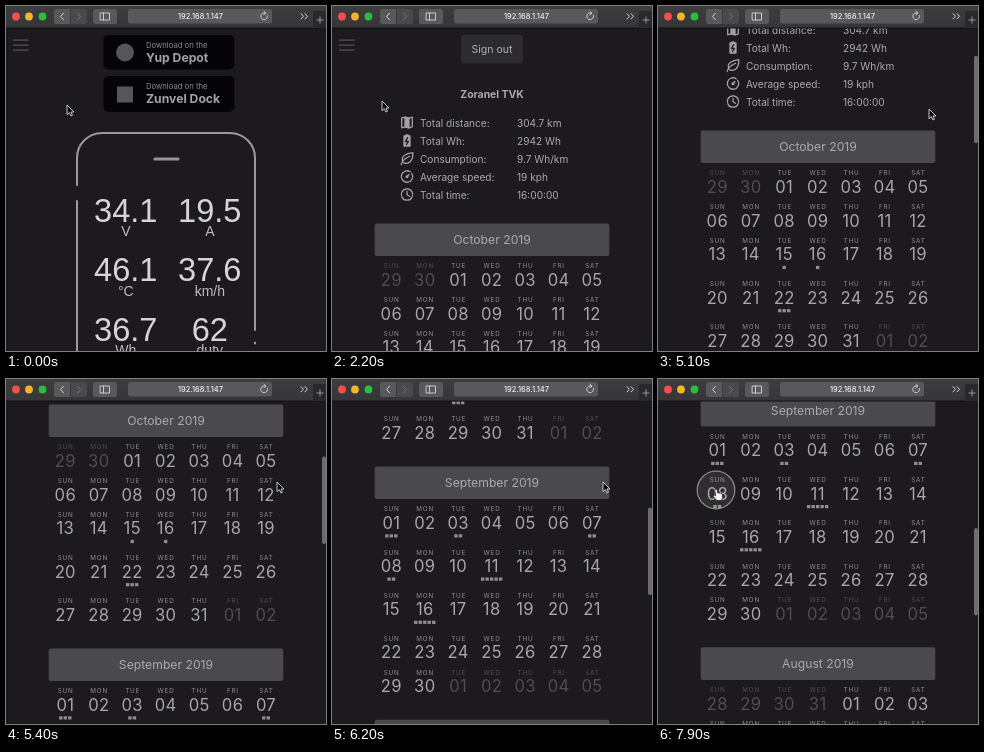
An HTML page that plays this animation: 320x345 px, repeating every 8000 ms.

```html
<!DOCTYPE html>
<html lang="en">
<head>
<meta charset="utf-8">
<title>Ride dashboard</title>
<style>
@property --scroll { syntax: "<number>"; inherits: true; initial-value: 0; }

html, body { margin: 0; width: 100%; height: 100%; overflow: hidden; background: #1c1a1d; }
svg { display: block; width: 320px; height: 345px; font-family: Inter, "Open Sans", sans-serif; }
.mid { text-anchor: middle; }
.line { fill: none; stroke-linecap: round; stroke-linejoin: round; }

/* One 8 s loop, advancing in 100 ms ticks (1.25% each) */
svg, #home, #menu, #account, #cursor, #arrow, #hand, #ring, #thumb {
  animation: 8s step-end -20ms infinite;
}
svg { animation-name: scroll; }
#home { animation-name: push; }
#menu { animation-name: leave; }
#account { animation-name: enter; }
#cursor { animation-name: move; }
#arrow { animation-name: arrow; }
#hand { animation-name: hand; }
#ring { animation-name: ring; }
#thumb { animation-name: thumb; }

#sheet { transform: translateY(calc(var(--scroll) * -1px)); }
#thumb rect { transform: translateY(calc(var(--scroll) * .281px)); }

@keyframes scroll {
  0% { --scroll: 0; }
  57.5% { --scroll: 0; animation-timing-function: steps(2); }
  60% { --scroll: 18; animation-timing-function: steps(3); }
  63.75% { --scroll: 93; animation-timing-function: steps(3); }
  67.5% { --scroll: 192; animation-timing-function: steps(4); }
  72.5% { --scroll: 302.5; animation-timing-function: steps(4); }
  77.5% { --scroll: 374; animation-timing-function: steps(4); }
  82.5% { --scroll: 427.5; animation-timing-function: steps(3); }
  86.25%, 100% { --scroll: 446.5; }
}
@keyframes push {
  0% { transform: none; }
  11.25% { transform: translateX(22px); }
  12.5% { transform: translateX(74px); }
  13.75% { transform: translateX(113px); }
  15% { transform: translateX(128.5px); }
  16.25% { transform: translateX(129px); }
  25%, 100% { transform: translateX(129px); visibility: hidden; }
}
@keyframes leave { 25%, 100% { visibility: hidden; } }
@keyframes enter { 0% { visibility: hidden; } 25%, 100% { visibility: visible; } }
@keyframes move {
  0% { transform: translate(61px, 99px); animation-timing-function: steps(3); }
  3.75% { transform: translate(43px, 77px); animation-timing-function: steps(3); }
  7.5% { transform: translate(18px, 42px); animation-timing-function: steps(1); }
  8.75% { transform: translate(15px, 38px); }
  10% { transform: translate(15px, 38px); animation-timing-function: steps(4); }
  15% { transform: translate(20px, 42px); }
  17.5% { transform: translate(20px, 42px); animation-timing-function: steps(4); }
  22.5% { transform: translate(50px, 95px); }
  37.5% { transform: translate(50px, 95px); animation-timing-function: steps(3); }
  41.25% { transform: translate(108px, 106px); animation-timing-function: steps(3); }
  45% { transform: translate(217px, 109px); animation-timing-function: steps(3); }
  48.75% { transform: translate(271px, 103px); }
  87.5% { transform: translate(271px, 103px); animation-timing-function: steps(3); }
  91.25% { transform: translate(195px, 107px); animation-timing-function: steps(2); }
  93.75% { transform: translate(95px, 109px); animation-timing-function: steps(1); }
  95% { transform: translate(46px, 109px); animation-timing-function: steps(1); }
  96.25% { transform: translate(29px, 109px); animation-timing-function: steps(2); }
  98.75%, 100% { transform: translate(58px, 110px); }
}
@keyframes arrow {
  0% { opacity: 1; }
  7.5% { opacity: 0; }
  26.25% { opacity: 1; }
  95%, 100% { opacity: 0; }
}
@keyframes hand {
  0% { opacity: 0; }
  7.5% { opacity: 1; }
  26.25% { opacity: 0; }
  95%, 100% { opacity: 1; }
}
@keyframes ring { 0% { opacity: 0; } 98.75%, 100% { opacity: 1; } }
@keyframes thumb { 0% { opacity: 0; } 55%, 100% { opacity: 1; } }

#menu text { font-size: 8.7px; fill: #959496; }
#menu .brand { font-size: 12px; letter-spacing: 2px; fill: #5c5b5d; }
.store { font-size: 12.2px; font-weight: 700; fill: #a3a2a4; }
.hint { font-size: 7.7px; fill: #8b8a8c; }
#readings { font-family: "Liberation Sans", Arial, sans-serif; text-anchor: middle; }
.value { font-size: 32.6px; fill: #d5d4d6; }
.unit { font-size: 14px; fill: #bdbcbe; }
.stat { font-size: 10.1px; fill: #aaa9ab; }
.month { font-size: 12.2px; fill: #abaaac; }
.day { font-size: 6.3px; letter-spacing: .8px; fill: #8d8c8e; }
.date { font-size: 16.6px; letter-spacing: .3px; fill: #a7a6a8; }
#account .dim { fill: #4e4d4f; }
</style>
</head>
<body>
<svg viewBox="0 0 320 345">
  <defs>
    <linearGradient id="shade" x1="0" y1="0" x2=".1" y2="1">
      <stop offset="0" stop-color="#2d2c2e"/>
      <stop offset="1" stop-color="#454446"/>
    </linearGradient>
    <linearGradient id="chrome" x1="0" y1="0" x2="0" y2="1">
      <stop offset="0" stop-color="#3d3c3f"/>
      <stop offset="1" stop-color="#363538"/>
    </linearGradient>
    <path id="burger" d="M7 34.2H22.5M7 39.2H22.5M7 44.2H22.5" stroke="#434244" stroke-width="1.7"/>
  </defs>

  <g id="menu">
    <rect y="22" width="130" height="323" fill="url(#shade)"/>
    <text class="brand" x="11" y="50">dorv</text>
  </g>

  <g id="home">
    <rect x="-2" y="22" width="322" height="323" fill="#1c1a1d"/>
    <use href="#burger"/>
    <rect x="97.5" y="29" width="131" height="34.5" rx="5" fill="#050406"/>
    <rect x="97.5" y="70" width="131" height="36" rx="5" fill="#050406"/>
    <circle cx="119" cy="46.5" r="9" fill="#565557"/>
    <rect x="111" y="80.5" width="16" height="16" fill="#565557"/>
    <text class="hint" x="140" y="42">Download on the</text>
    <text class="store" x="140" y="55.5">Yup Depot</text>
    <text class="hint" x="140" y="83">Download on the</text>
    <text class="store" x="140" y="96.7">Zunvel Dock</text>
    <path class="line" stroke="#9a999b" stroke-width="2"
      d="M71 179V152A25 25 0 0 1 96 127H224A25 25 0 0 1 249 152V324M249 336.5V337.5M71 195V345"/>
    <path class="line" stroke="#949395" stroke-width="3.2" d="M149 153H172"/>
    <g id="readings"></g>
  </g>

  <g id="account">
    <rect y="22" width="320" height="323" fill="#1c1a1d"/>
    <g id="sheet">
      <use href="#burger"/>
      <rect x="129" y="29" width="62" height="28.5" rx="2" fill="#2c2b2d"/>
      <text class="mid" x="160" y="47" font-size="10.5" fill="#b0afb1">Sign out</text>
      <text class="mid" x="160" y="92" font-size="10.4" font-weight="700" fill="#a9a8aa">Zoranel TVK</text>
      <g class="line" stroke="#a1a0a2" stroke-width="1.3">
        <g transform="translate(75 116.5)">
          <path d="M-5.3-4.5-2-5.3 2-4.3 5.3-5.3V4.3L2 5.3-2 4.3-5.3 5.3Z"/>
          <path d="M-2-5.3 2-4.3V5.3L-2 4.3Z" fill="#a1a0a2"/>
        </g>
        <g transform="translate(75 134.5)">
          <path d="M-3-4.5H-1V-5.5H1V-4.5H3V5.5H-3Z" fill="#a1a0a2"/>
          <path d="M.7-2.8-1.6 1H1.4L-.5 4" stroke="#1c1a1d"/>
        </g>
        <path transform="translate(75 152.5)" d="M-5.8 6C-5 1 0-1 2.6-2.2M-4 3.5C-7-3 0-5 5.8-5.8C6.2 2 2 6.5-3.2 4.4"/>
        <path transform="translate(75 170.5)" d="M3.2-4.7A5.7 5.7 0 1 0 4.7-3.2M0 0 2-2M-1 0A1 1 0 1 0 0-1"/>
        <path transform="translate(75 188.5)" d="M0-5.7A5.7 5.7 0 1 1-.01-5.7M0-3.2V.3L2.5 1.8"/>
      </g>
    </g>
  </g>

  <g id="thumb"><rect x="316" y="23.5" width="4" height="87.5" rx="2" fill="#6c6b6d"/></g>

  <g id="toolbar">
    <rect width="320" height="22" fill="url(#chrome)"/>
    <rect y="21.5" width="320" height="1" fill="#111012"/>
    <circle cx="10" cy="10.5" r="3.9" fill="#f84e48"/>
    <circle cx="23" cy="10.5" r="3.9" fill="#f4b42c"/>
    <circle cx="36.5" cy="10.5" r="3.9" fill="#2dbd3e"/>
    <g fill="#59585b">
      <path d="M50.5 3H64V18H50.5Q48 18 48 15.5V5.5Q48 3 50.5 3Z"/>
      <path d="M65 3H78.5Q81 3 81 5.5V15.5Q81 18 78.5 18H65Z" fill="#4a494c"/>
      <rect x="87" y="3" width="24" height="15" rx="2.5"/>
      <rect x="122" y="3" width="144" height="14.5" rx="2.5"/>
    </g>
    <g class="line" stroke="#d6d5d8">
      <path d="M57.5 7.3 54.5 10.5 57.5 13.7"/>
      <path d="M71.5 7.3 74.5 10.5 71.5 13.7" stroke="#777679"/>
      <path d="M94.5 7H103.5V14H94.5ZM97.5 7V14" stroke-width=".9"/>
      <path d="M261.5 9.5A3.4 3.4 0 1 1 259.5 7.1M258 5.3 260 7.2 257.8 8.8" stroke-width=".9"/>
      <path d="M295 7.7 297.5 10.3 295 12.9M299 7.7 301.5 10.3 299 12.9"/>
    </g>
    <text class="mid" x="194.5" y="13.2" font-size="7.5" font-weight="500" fill="#f0eff2">192.168.1.147</text>
    <rect x="307" y="5" width="13" height="17" fill="#29282b"/>
    <path d="M310.5 14H317.5M314 10.5V17.5" stroke="#98979a"/>
  </g>

  <circle id="ring" cx="58" cy="111" r="18.8" fill="#fff" fill-opacity=".09" stroke="#a9a8aa" stroke-opacity=".75" stroke-width="1.3"/>
  <g id="cursor" stroke-linejoin="round">
    <path id="arrow" d="M0 0V9.7L2.3 7.6 3.9 11 5.4 10.3 4 7H7Z" fill="#0a0a0b" stroke="#d8d7da" stroke-width=".9"/>
    <path id="hand" fill="#f4f3f6" stroke="#1a191c" stroke-width=".7"
      d="M-1.2 1Q-1 0 0 0T1.3 1.2L1.8 4Q3.2 3.2 3.7 4.2Q5 3.7 5.3 4.8Q6.6 4.6 6.5 6V8.5L5.5 11.5H.7L-2.6 7.4Q-3 6-1.7 6L-.3 7Z"/>
  </g>
</svg>
<script>
const $ = id => document.getElementById(id);

function add(parent, tag, attrs, text = "") {
  const node = document.createElementNS("http://www.w3.org/2000/svg", tag);
  for (const key in attrs) node.setAttribute(key, attrs[key]);
  node.textContent = text;
  return parent.appendChild(node);
}

["Home", "Account", "FAQ", "Overlay", "Shop", "Setup", "Contact"].forEach((label, i) =>
  add($("menu"), "text", { x: 11, y: 74 + i * 23.8 }, label));

const sheet = $("sheet");
[
  ["Total distance:", "304.7 km"],
  ["Total Wh:", "2942 Wh"],
  ["Consumption:", "9.7 Wh/km"],
  ["Average speed:", "19 kph"],
  ["Total time:", "16:00:00"]
].forEach(([label, value], i) => {
  const y = 120.5 + i * 18;
  add(sheet, "text", { class: "stat", x: 88, y }, label);
  add(sheet, "text", { class: "stat", x: 185, y }, value);
});

// Draws one month and returns the top of the next; trips maps a date to its ride count
const dayNames = ["SUN", "MON", "TUE", "WED", "THU", "FRI", "SAT"];

function drawMonth(top, month, name, trips) {
  const lead = new Date(2019, month, 1).getDay();
  const length = new Date(2019, month + 1, 0).getDate();
  add(sheet, "rect", { x: 42.7, y: top - 0.6, width: 234.6, height: 32.6, rx: 2, fill: "#4a494b" });
  add(sheet, "text", { class: "month mid", x: 160, y: top + 20.2 }, name + " 2019");
  let y = top + 42;
  for (let first = 1 - lead; ; first += 7) {
    let busy = false;
    dayNames.forEach((dayName, i) => {
      const day = first + i;
      const x = 59.3 + i * 33.45;
      const dim = day < 1 || day > length ? " dim" : "";
      const date = new Date(2019, month, day).getDate();
      add(sheet, "text", { class: "day mid" + dim, x: x + 0.4, y: y + 2.4 }, dayName);
      add(sheet, "text", { class: "date mid" + dim, x, y: y + 19.8 }, String(date).padStart(2, "0"));
      const count = trips[day] || 0;
      for (let n = 0; n < count; n++) {
        add(sheet, "rect", { x: x - 1.7 + (n - (count - 1) / 2) * 4.5, y: y + 25.3, width: 3.4, height: 3.2, fill: "#8e8d8f" });
      }
      if (count) busy = true;
    });
    if (first + 7 > length) return y + 48;
    y += busy ? 43.2 : 33.8;
  }
}

const september = drawMonth(218, 9, "October", { 15: 1, 16: 1, 22: 3 });
const august = drawMonth(september, 8, "September", { 1: 3, 3: 2, 7: 2, 8: 2, 11: 5, 16: 5 });
drawMonth(august, 7, "August", {});

// Live readings: unit, start, end, decimals
const gauges = [
  ["V", 34.1, 34.1, 1], ["A", 19.5, 20.4, 1],
  ["°C", 46.1, 47.1, 1], ["km/h", 37.6, 40.2, 1],
  ["Wh", 36.7, 36.9, 1], ["duty", 62, 56, 0]
].map(([unit, from, to, digits], i) => {
  const x = i % 2 ? 203.8 : 119.8;
  const y = 215.5 + Math.floor(i / 2) * 59.8;
  const node = add($("readings"), "text", { class: "value", x, y });
  add($("readings"), "text", { class: "unit", x, y: y + 14.3 }, unit);
  return { node, from, to, digits };
});

function showReadings(ms) {
  const k = Math.min(1, Math.floor(ms / 300) / 4);
  for (const { node, from, to, digits } of gauges) {
    node.textContent = (from + (to - from) * k).toFixed(digits);
  }
}

let start;
function tick(now) {
  start ??= now;
  showReadings((now - start + 20) % 8000);
  requestAnimationFrame(tick);
}
showReadings(0);
requestAnimationFrame(tick);
</script>
</body>
</html>
```
